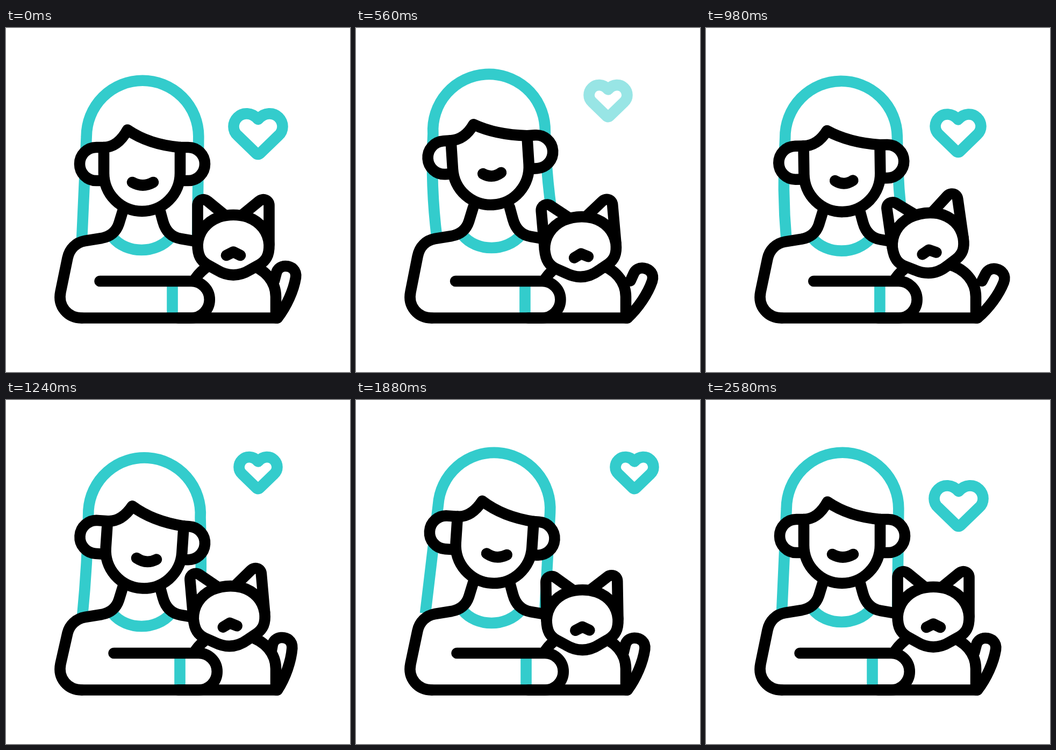
Write an HTML page with a canvas that moves like this. It is 640x640 px and loops after 2820 ms.

```html
<!DOCTYPE html>
<html lang="en">
<head>
<meta charset="utf-8">
<title>Cat cuddle</title>
<style>
  html, body { margin: 0; width: 640px; height: 640px; overflow: hidden; background: #fff; }
  canvas { display: block; }
</style>
</head>
<body>
<canvas id="stage" width="640" height="640"></canvas>
<script>
const ctx = document.getElementById('stage').getContext('2d');
const LOOP = 2820, STEP = 20;
const BLACK = '#000', TEAL = '#3cc', WHITE = '#fff';
const POSES = [210, 380, 740, 1240, 1880, 2240, 2580];

// Smooth curve through keys that never overshoots them.
function track(times, values) {
  const last = times.length - 1;
  const rate = i => (values[i + 1] - values[i]) / (times[i + 1] - times[i]);
  const slope = i => {
    if (i === 0 || i === last) return 0;
    const a = rate(i - 1), b = rate(i);
    return a * b <= 0 ? 0 : 2 * a * b / (a + b);
  };
  return t => {
    if (t <= times[0]) return values[0];
    if (t >= times[last]) return values[last];
    let i = 0;
    while (t > times[i + 1]) i++;
    const span = times[i + 1] - times[i], u = (t - times[i]) / span;
    const w = u * u * (3 - 2 * u), v = u * (1 - u);
    return values[i] + (values[i + 1] - values[i]) * w
      + span * v * (slope(i) * (1 - u) - slope(i + 1) * u);
  };
}
const poses = (...values) => track(POSES, values);

const motion = {
  headX: poses(0, -1.5, -2.5, 3.5, 3.5, -2.5, 0),
  headY: track([210, 380, 540, 740, 1240, 1540, 1880, 2080, 2240, 2580],
               [0, -7.5, -12, -9, 9.5, -11, 0, -12, -6, 0]),
  headTurn: poses(0, -1.5, -5, 3.8, 3.8, -4.6, 0),
  look: poses(0, 0.5, -0.5, 4.5, 5, -0.5, 0),
  lift: poses(0, 2.5, 7, 1.7, 0.7, 6.5, 0),
  smile: poses(1, 0.98, 0.77, 0.95, 0.97, 0.8, 1),
  bodyY: poses(0, -4, -4, 8, 2, -3.5, 0),
  strandL: poses(141, 145, 154, 142, 129, 152, 141),
  strandR: poses(356, 364, 376, 360, 351, 369, 356),
  bulge: poses(0, 0, -17, 4, 0, -16, 0),
  elbow: poses(0, -3.5, 25, 26, 13, 0, 0),
  hand: poses(0, -10, 13.5, 14, 7, 0, 0),
  cuff: poses(0, -3.5, 13.5, 14, 7, 0, 0),
  catX: poses(0, 0, -11.5, -8, -2, -1, 0),
  catY: poses(0, 11.5, -4.5, -1.5, 5.5, 5, 0),
  catTurn: poses(0, 0, -10, -5, -1, -2, 0),
  earDrop: poses(0, 1.5, 0, 0, 2.5, 5, 0),
  tail: track([210, 380, 500, 740, 980, 1240, 1500, 1740, 1880, 2120, 2240, 2380, 2580],
              [0, 5.5, 12, -4, 12, -5, 12, -5, -1.3, 12, 7, 2.5, 0]),
  heartX: track([1240, 1780, 1880, 2060, 2200], [469, 529, 518, 485, 470]),
  heartY: track([210, 380, 480, 690, 691, 740, 1240, 2190, 2191, 2240, 2580],
                [197, 150, 135.5, 135.5, 288, 278, 135.5, 135.5, 285, 272.5, 197]),
  heartSize: track([210, 380, 480, 690, 691, 740, 1090, 1240, 2190, 2191, 2240, 2580],
                   [1, 0.91, 0.78, 0.78, 0.58, 0.62, 1, 0.78, 0.78, 0.58, 0.64, 1]),
  heartAlpha: track([500, 620, 690, 740, 820, 1940, 2060, 2190, 2240, 2290],
                    [1, 0, 0, 0.39, 1, 1, 0, 0, 0.61, 1])
};

function stroke(d, color = BLACK, cap = 'round') {
  ctx.strokeStyle = color;
  ctx.lineWidth = 20.6;
  ctx.lineCap = cap;
  ctx.lineJoin = 'round';
  ctx.stroke(new Path2D(d));
}
function fill(d) {
  ctx.fillStyle = WHITE;
  ctx.fill(new Path2D(d));
}
function shape(d) {
  fill(d);
  stroke(d);
}
function group(x, y, degrees, draw) {
  ctx.save();
  ctx.translate(x, y);
  ctx.rotate(degrees * Math.PI / 180);
  draw();
  ctx.restore();
}

function drawHair(p) {
  const a = p.headTurn * Math.PI / 180, r = 104.3;
  const cos = Math.cos(a), sin = Math.sin(a);
  const cx = 253 + p.headX + cos + 68 * sin - p.look;
  const cy = 270 + p.headY + sin - 68 * cos;
  const lx = cx - r * cos, ly = cy - r * sin;
  const rx = cx + r * cos, ry = cy + r * sin;
  const endY = 395 + p.bodyY;
  const bend = (x, y, end) => `${(x + end) / 2 + p.bulge} ${(y + endY) / 2}`;
  stroke(`M${p.strandL} ${endY} Q${bend(lx, ly, p.strandL)} ${lx} ${ly}
    A${r} ${r} 0 0 1 ${rx} ${ry}
    Q${bend(rx, ry, p.strandR)} ${p.strandR} ${endY}`, TEAL, 'butt');
}

function drawBody(p) {
  const y = v => v + p.bodyY;
  const left = `M218 ${y(338)} L210 ${y(364)} C205 ${y(379)} 194 ${y(388)} 178 ${y(391)}
    L147 ${y(396)} C130 ${y(399)} 118 ${y(411)} 114.5 ${428 + p.bodyY * 0.7}
    L101.5 491 C96 518 115 539.5 141 539.5`;
  const right = `L360 ${y(398)} L325 ${y(392)} C308 ${y(389)} 297 ${y(378)} 292 ${y(360)} L286 ${y(338)}`;
  fill(`${left} H360 ${right} Z`);
  stroke(`M198 ${y(389)} C224 ${y(421)} 280 ${y(421)} 307 ${y(389)}`, TEAL, 'butt');
  stroke(left);
  stroke(right.replace('L', 'M'));
}

function drawHead(p) {
  group(253 + p.headX, 270 + p.headY, p.headTurn, () => {
    const top = -48 - p.lift, base = 14 - p.lift;
    const l = -85 - p.look, r = 86 - p.look;
    shape(`M-71 ${top} H${l} A31 31 0 0 0 ${l} ${base} H-71`);
    shape(`M71 ${top} H${r} A31 31 0 0 1 ${r} ${base} H71`);
    shape(`M-71 ${top} V0 A71 71 0 0 0 71 0 V${top}`);
    shape(`M-71 ${top} Q-45 ${top} -27 -80.5 Q13 ${top - 5} 71 ${top}`);
    const mid = 1.5 + p.look, half = 19.5 * p.smile, y = 17 - p.lift * 0.9;
    stroke(`M${mid - half} ${y} Q${mid} ${y + 11} ${mid + half} ${y}`);
  });
}

function drawHeart(p) {
  if (p.heartAlpha <= 0) return;
  const s = v => v * p.heartSize;
  const curve = (...v) => 'C' + v.map(s).join(' ');
  ctx.globalAlpha = p.heartAlpha;
  group(p.heartX, p.heartY, 0, () => stroke(`M0 ${s(-27)}`
    + curve(-12, -41, -29, -40, -38, -31) + curve(-48, -21, -48, -6, -38, 3)
    + `L${s(-4)} ${s(36)} Q0 ${s(40)} ${s(4)} ${s(36)} L${s(38)} ${s(3)}`
    + curve(48, -6, 48, -21, 38, -31) + curve(29, -40, 12, -41, 0, -27) + 'Z', TEAL));
  ctx.globalAlpha = 1;
}

function drawCatBody(p) {
  group(505, 539.5, p.tail, () =>
    shape('M0 0 C17 -22 30 -51 34 -75 C36 -89 26 -96.5 15 -96.5 C6 -96.5 0 -91 -2 -84 L-6 -69'));
  const back = 'C482 448 502 472 502 500 V539.5';
  const chest = 'M346 478 Q358 450 392 434';
  fill(`${chest} L452 440 ${back} H346 Z`);
  stroke(chest);
  stroke(`M452 440 ${back}`);
}

function drawArm(p) {
  const wrist = 344.5 + p.hand, x = 309.5 + p.cuff;
  const arm = `M${174.5 + p.elbow} 471 H${wrist} A34.25 34.25 0 0 1 ${wrist} 539.5 H320`;
  fill(arm);
  stroke(`M${x} 471 V539.5`, TEAL, 'butt');
  stroke(arm);
  stroke('M141 539.5 H505');
}

function drawCatHead(p) {
  group(423 + p.catX, 403 + p.catY, p.catTurn, () => {
    const e = p.earDrop;
    const ear = `M-66.5 0 V${e - 73} C-66.5 ${e - 83} -55 ${e - 87} -48 ${e - 81} L-15 -54`;
    for (const side of [1, -1]) {
      ctx.save();
      ctx.scale(side, 1);
      shape(ear);
      ctx.restore();
    }
    shape(`M-66.5 0 C-65 -23 -51 -42 -27 -51 Q0 -59.5 27 -51 C51 -42 65 -23 66.5 0
      C67 21 60 30 49 37 L31 47 Q0 66 -31 47 L-49 37 C-60 30 -66.5 21 -66.5 0 Z`);
    stroke('M-13 20 L0 13.5 L13 20');
  });
}

function draw(now) {
  const t = Math.floor(now % LOOP / STEP) * STEP;
  const p = {};
  for (const name in motion) p[name] = motion[name](t);
  ctx.fillStyle = WHITE;
  ctx.fillRect(0, 0, 640, 640);
  drawHair(p);
  drawBody(p);
  drawHead(p);
  drawHeart(p);
  drawCatBody(p);
  drawArm(p);
  drawCatHead(p);
}

let start;
function tick(now) {
  start ??= now;
  draw(now - start);
  requestAnimationFrame(tick);
}
draw(0);
requestAnimationFrame(tick);
</script>
</body>
</html>
```
